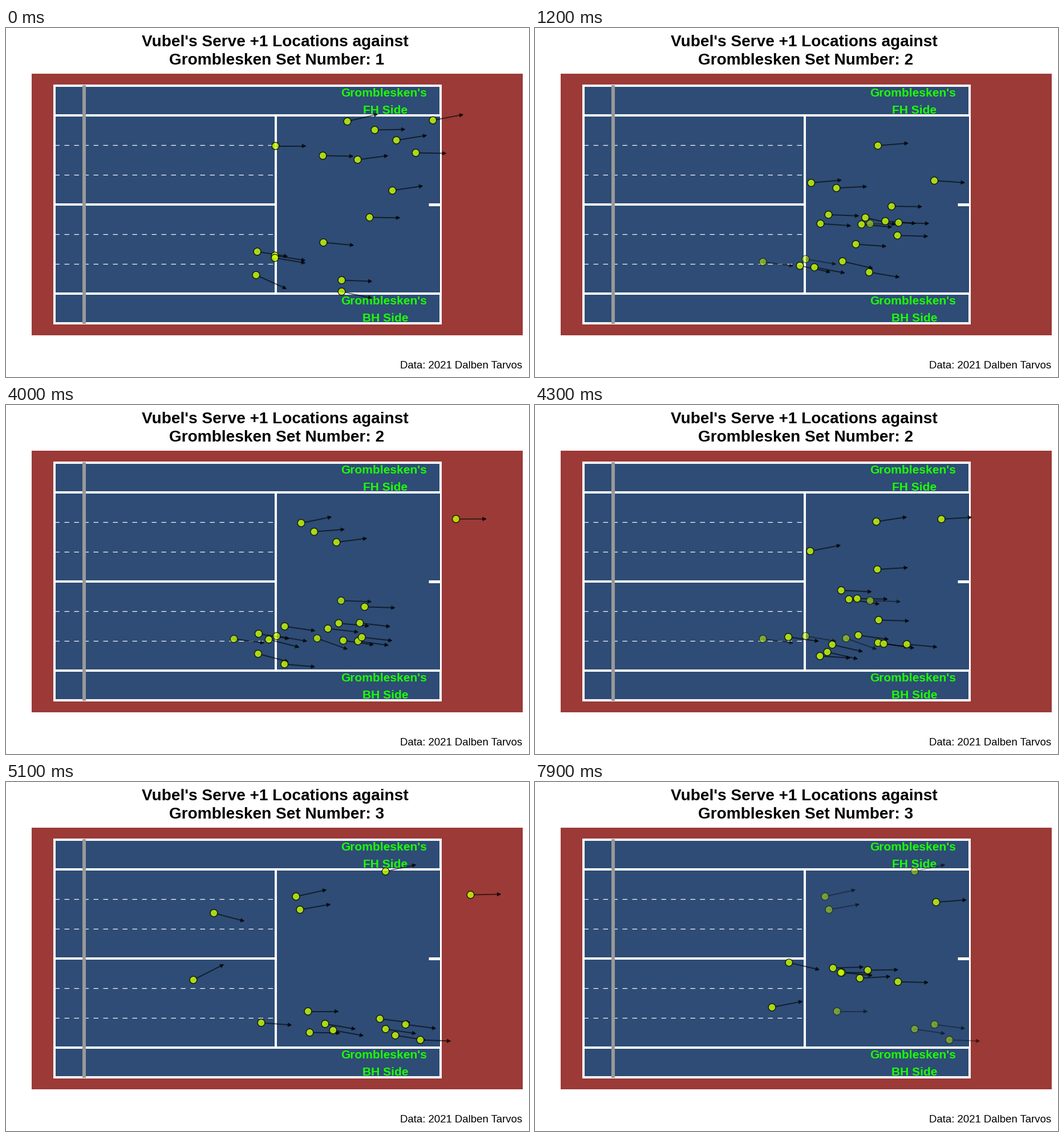
Animation, 917 px wide and 611 px high, one loop 8 s. Source, as a matplotlib script:

```python
import matplotlib.pyplot as plt
import numpy as np
from matplotlib.animation import FuncAnimation
from matplotlib.collections import LineCollection, PolyCollection
from matplotlib.patches import Rectangle

W, H, DPI = 917, 611, 100
PX = 72 / DPI                       # points per pixel
FRAMES, INTERVAL, STEPS = 80, 100, 12
MOVE_STARTS = (4, 39, 74)           # last still frame before each transition
SHOT_DX, ALPHA, LINE_ALPHA = 53, 0.8, 0.6

RED, BLUE, NET = "#9b3a37", "#2e4c75", "#999999"
BALL, LABEL = (0.8, 1.0, 0.0), "#1cff05"
PLAYER, OPPONENT = "Vubel", "Gromblesken"


def shot(x, y, rise=None):
    """Arrows fan out from the net unless a shot gives its own rise."""
    return x, y, 40 * (y - 320) / (x - 100) if rise is None else rise


# Ball positions per set; equal places in the lists are one ball.
SETS = [np.array([shot(*p) for p in points], float) for points in (
    [(555, 223, 1), (471, 398), (684, 196), (616, 230), (637, 331),
     (472, 206, 0), (748, 161), (440, 391), (588, 441, 2), (471, 402),
     (438, 432, 24), (598, 163), (718, 218, 1), (588, 461), (556, 375),
     (677, 284, -8), (646, 178, -1)],
    [(643, 395), (490, 207), (559, 210, -2), (442, 398), (637, 345),
     (622, 412), (563, 387), (572, 224), (440, 407, 14), (814, 199, 1),
     (589, 396), (472, 408), (484, 458, 5), (584, 410), (418, 436),
     (614, 402), (545, 408, 19), (587, 342), (399, 409, 7), (474, 404)],
    [(364, 229, 14), (814, 197, -1), (328, 346, -27), (447, 421, 4),
     (532, 438, 1), (559, 423), (573, 434), (655, 414), (682, 443),
     (508, 200), (515, 223), (665, 156), (529, 401, 0), (665, 432),
     (700, 424), (726, 451, 2)],
    [(558, 437), (547, 228), (537, 461), (627, 191), (621, 210),
     (508, 207, 0), (484, 192), (482, 210), (571, 218)],
)]

plt.rcParams["font.family"] = "Liberation Sans"
plt.rcParams["lines.scale_dashes"] = False
fig = plt.figure(figsize=(W / DPI, H / DPI), dpi=DPI, facecolor="white")
ax = fig.add_axes([0, 0, 1, 1])
ax.set_xlim(-0.5, W - 0.5)
ax.set_ylim(H - 0.5, -0.5)
ax.axis("off")


def line(x0, y0, x1, y1, width=4, color="white", **style):
    style.setdefault("solid_capstyle", "butt")
    ax.plot([x0, x1], [y0, y1], color=color, lw=width * PX, zorder=2, **style)


def text(x, y, label, size, **style):
    style = {"ha": "center", "weight": "bold", "zorder": 3, **style}
    return ax.text(x, y, label, fontsize=size * PX, va="baseline", **style)


def draw_court():
    left, right, service = 84, 761.5, 472.5
    ax.add_patch(Rectangle((44.5, 79.5), 860.5, 457.5, color=RED, lw=0))
    ax.add_patch(Rectangle((left, 100), right - left, 416.5, color=BLUE, lw=0))
    dash = 8.5 * PX
    for y in (204, 256, 360, 412):
        line(left, y, service, y, 1.2, dashes=(dash, dash),
             dash_capstyle="butt")
    for y in (100, 152, 464, 516.5):
        line(left, y, right, y, solid_capstyle="projecting")
    line(left, 100, left, 516.5)
    line(right, 100, right, 152)
    line(right, 464, right, 516.5)
    line(right - 0.5, 152, right - 0.5, 464, 3)
    line(service, 152, service, 464)
    line(left, 308, service, 308)
    line(740, 308, right, 308, 5)
    line(136.7, 99.5, 136.7, 517, 6, NET)


draw_court()
for side, top in (("FH", 119.5), ("BH", 484)):
    text(662, top, f"{OPPONENT}'s", 21, color=LABEL)
    text(665, top + 30, f"{side} Side", 21, color=LABEL)
text(471, 32, f"{PLAYER}'s Serve +1 Locations against", 28)
title = text(474.5, 63, "", 28)
text(905, 596, "Data: 2021 Dalben Tarvos", 18.7, ha="right", weight="normal")

shafts = LineCollection([], linewidths=2 * PX, capstyle="butt", zorder=4)
heads = PolyCollection([], linewidths=1.6 * PX, joinstyle="miter", zorder=4.1)
balls = ax.scatter([], [], s=(12.6 * PX) ** 2, linewidths=1.4 * PX, zorder=5)
ax.add_collection(shafts, autolim=False)
ax.add_collection(heads, autolim=False)


def state_at(frame):
    """Shots, their opacity and the set number shown in one frame."""
    index = max((i for i, s in enumerate(MOVE_STARTS) if frame > s), default=0)
    t = min(max(frame - MOVE_STARTS[index], 0) / STEPS, 1)
    old, new = SETS[index], SETS[index + 1]
    n = min(len(old), len(new))
    shots = np.vstack([old[n:], new[n:], old[:n] * (1 - t) + new[:n] * t])
    fade = np.concatenate([np.full(len(old) - n, 1 - t),
                           np.full(len(new) - n, t), np.ones(n)])
    return shots[fade > 0], fade[fade > 0], index + 1 + (t >= 0.5)


def arrow_heads(start, tip):
    along = (tip - start) / np.linalg.norm(tip - start, axis=1, keepdims=True)
    across = along[:, ::-1] * (-1, 1)
    tip = tip - along * 0.8
    base = tip - along * 5.2
    return np.stack([tip, base + across * 3, base - across * 3], axis=1)


def rgba(color, alpha):
    return [(*color, a) for a in alpha]


def update(frame):
    shots, fade, number = state_at(frame)
    start = shots[:, :2]
    tip = start + np.column_stack([np.full(len(shots), SHOT_DX), shots[:, 2]])
    ink = rgba((0, 0, 0), fade * LINE_ALPHA)
    shafts.set_segments(np.stack([start, tip], axis=1))
    shafts.set_color(ink)
    heads.set_verts(arrow_heads(start, tip))
    heads.set_facecolor(ink)
    heads.set_edgecolor(ink)
    balls.set_offsets(start)
    balls.set_facecolor(rgba(BALL, fade * ALPHA))
    balls.set_edgecolor(rgba((0, 0, 0), fade * ALPHA))
    title.set_text(f"{OPPONENT} Set Number: {number}")
    return shafts, heads, balls, title


anim = FuncAnimation(fig, update, frames=FRAMES, interval=INTERVAL,
                     repeat=True, repeat_delay=0, blit=False)
plt.show()
```
